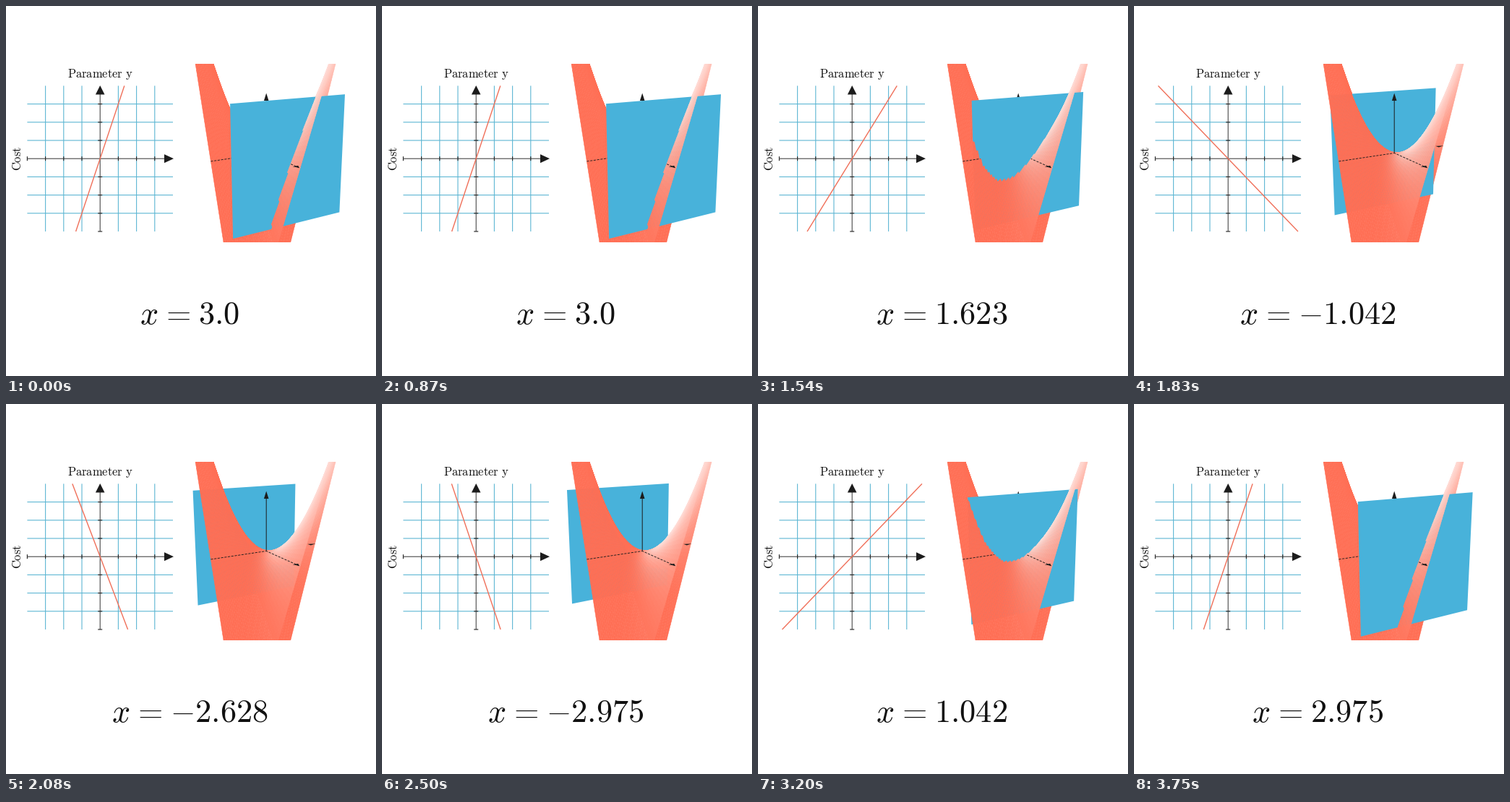
A matplotlib script that plays this animation: 512x512 px, repeating every 3850 ms.

```python
import numpy as np
import matplotlib.pyplot as plt
from matplotlib.animation import FuncAnimation
from matplotlib.collections import LineCollection, PolyCollection
from matplotlib.colors import to_rgb
from matplotlib.patches import Polygon, Rectangle

DPI = 64
LOOP, TICK = 3850, 25
RED, BLUE, GRID, INK = "#ff6f55", "#48b2da", "#5cb6d3", "#1c1c1c"
PHI, THETA = np.radians(75), np.radians(-30)
FOCAL, SCALE = 29.0, 20.7
CENTER = np.array([360.2, 203.5])
BEND = 0.75                      # surface: z = BEND * x * y
HOLD, SWEEP = 15, 21             # steps at rest, steps per sweep

# moments (step, ms) between which the steps are evenly spread
BEATS = np.array([
    (0, 0), (1, 80), (8, 540), (9, 620), (13, 870), (14, 950), (16, 1080),
    (17, 1160), (23, 1540), (24, 1620), (25, 1660), (26, 1750), (31, 2080),
    (32, 2160), (33, 2200), (34, 2290), (41, 2750), (42, 2830), (43, 2870),
    (44, 2950), (48, 3200), (49, 3290), (50, 3330), (51, 3410), (56, 3750),
    (57, LOOP)])


def pt(px):
    return px * 72 / DPI


def smooth(u):
    def sig(v):
        return 1 / (1 + np.exp(-v))
    edge = sig(-5)
    return (sig(10 * (u - 0.5)) - edge) / (1 - 2 * edge)


def value_at(ms):
    step = int(np.interp(ms, BEATS[:, 1], BEATS[:, 0]) + 1e-6)
    k = max(step - HOLD, 0)
    if k <= SWEEP:
        return 3 - 6 * smooth(k / SWEEP)
    return -3 + 6 * smooth((k - SWEEP) / SWEEP)


def depth(x, y, z):
    toward = np.cos(THETA) * x + np.sin(THETA) * y
    return np.sin(PHI) * toward + np.cos(PHI) * z


def project(x, y, z):
    x, y, z = np.broadcast_arrays(*(np.asarray(c, float) for c in (x, y, z)))
    right = -np.sin(THETA) * x + np.cos(THETA) * y
    toward = np.cos(THETA) * x + np.sin(THETA) * y
    up = np.sin(PHI) * z - np.cos(PHI) * toward
    m = SCALE * FOCAL / (FOCAL - depth(x, y, z))
    return np.stack([CENTER[0] + m * right, CENTER[1] - m * up], axis=-1)


def surface(n=70):
    """Faces of the saddle from back to front: outlines, colours, depths."""
    g = np.linspace(-4, 4, n + 1)
    x, y = np.meshgrid(g, g, indexing="ij")
    p = project(x, y, BEND * x * y)
    quads = np.stack([p[:-1, :-1], p[1:, :-1], p[1:, 1:], p[:-1, 1:]], axis=2)
    quads = quads.reshape(-1, 4, 2)

    mid = (g[:-1] + g[1:]) / 2
    x, y = (c.ravel() for c in np.meshgrid(mid, mid, indexing="ij"))
    z = BEND * x * y
    normal = np.stack([-BEND * y, -BEND * x, np.ones_like(x)], axis=1)
    sun = np.array([-7, -9, 10]) - 0.668 * np.stack([x, y, z], axis=1)
    dot = (normal * sun).sum(1)
    dot /= np.linalg.norm(normal, axis=1) * np.linalg.norm(sun, axis=1)
    gloss = 0.8 * np.clip(dot, 0, 1)[:, None] ** 3
    rgb = gloss + (1 - gloss) * np.array(to_rgb(RED))

    d = depth(x, y, z)
    seen = (quads[:, :, 1].max(1) > 79) & (quads[:, :, 1].min(1) < 328)
    order = np.argsort(d)
    order = order[seen[order]]
    return quads[order], rgb[order], d[order]


fig = plt.figure(figsize=(512 / DPI, 512 / DPI), dpi=DPI, facecolor="white")
ax = fig.add_axes([0, 0, 1, 1])
ax.set_xlim(0, 512)
ax.set_ylim(512, 0)
ax.axis("off")


def stroke(xs, ys, color=INK, px=1.0, z=2, **kw):
    return ax.plot(xs, ys, color=color, lw=pt(px), zorder=z, snap=False,
                   solid_capstyle="butt", **kw)[0]


def triangle(points, z):
    patch = Polygon(points, closed=True, fc=INK, ec="none", zorder=z)
    return ax.add_patch(patch)


def label(x, y, text, px, **kw):
    return ax.text(x, y, text, fontsize=pt(px), color="#111111", ha="center",
                   math_fontfamily="cm", **kw)


def segments(parts, color, z):
    ax.add_collection(LineCollection(parts, colors=color, lw=pt(1.1),
                                     zorder=z, snap=False))


# flat chart
OX, OY, UNIT, HALF = 130.2, 211.2, 25.2, 100.8
lines, marks = [], [[(OX - HALF, OY - 3), (OX - HALF, OY + 3)],
                    [(OX - 3, OY + HALF), (OX + 3, OY + HALF)]]
for i in (-3, -2, -1, 1, 2, 3):
    gx, gy = OX + i * UNIT, OY + i * UNIT
    lines += [[(gx, OY - HALF), (gx, OY + HALF)],
              [(OX - HALF, gy), (OX + HALF, gy)]]
    marks += [[(gx, OY - 3), (gx, OY + 3)], [(OX - 3, gy), (OX + 3, gy)]]
segments(lines, GRID, 1)
segments(marks, INK, 2)
stroke([OX - HALF, OX + HALF - 6], [OY, OY], "#333333")
stroke([OX, OX], [OY - HALF + 6, OY + HALF], "#333333")
triangle([(232, OY), (219, OY - 6), (219, OY + 6)], 3)
triangle([(OX, 110), (OX - 6.3, 122.5), (OX + 6.3, 122.5)], 3)
slope_line = stroke([], [], "#f0705a", 1.4, z=4)
label(130.5, 98.5, r"$\mathrm{Parameter\ y}$", 16.5, va="baseline")
label(16.3, 211, r"$\mathrm{Cost}$", 16.5, va="center", rotation=90)
readout = label(254.4, 440, "", 44.3, va="baseline")

# space view
quads, rgb, face_depth = surface()
panel = Rectangle((236, 79.5), 250, 247.5, transform=ax.transData)


def face_layer(z):
    layer = PolyCollection([], zorder=z, linewidths=pt(0.5))
    ax.add_collection(layer)
    layer.set_clip_path(panel)
    return layer


def axis_piece(start, end, z):
    p = project(*np.array([start, end], float).T)
    return stroke(p[:, 0], p[:, 1], px=0.9, z=z, dashes=(3.5, 1.8))


X_END, Y_TIP = 3.9, 3.5
back, front = face_layer(11), face_layer(14)
plane = ax.add_patch(Polygon(np.zeros((4, 2)), fc=BLUE, ec="none", zorder=13))

axis_piece((0, -4, 0), (0, 0, 0), 12)
axis_piece((X_END, 0, 0), (0, 0, 0), 12)
y_tip = triangle(project([0, .2, -.2], [4.05, Y_TIP, Y_TIP], 0), 12)
near_y = axis_piece((0, -4, 0), (0, 0, 0), 15)
near_x = axis_piece((X_END, 0, 0), (0, 0, 0), 15)
triangle(project([X_END, X_END - .4, X_END - .4], [0, .2, -.2], 0), 15)

top = project(0, 0, 4)
z_line = stroke([CENTER[0]] * 2, [CENTER[1], top[1] + 8])
z_tip = triangle([top, top + (-3.3, 10.5), top + (3.3, 10.5)], 12)


def set_span(line, start, end):
    p = project(*np.array([start, end], float).T)
    line.set_data(p[:, 0], p[:, 1])


def draw(n):
    x = value_at(n * TICK + 20)
    number = str(round(float(x), 3)).replace("-", "{-}")
    readout.set_text(r"$x\hspace{0.078}=\hspace{0.078}" + number + "$")

    reach = min(4, 4 / max(abs(x), 1e-6))
    ys = np.array([-reach, reach])
    slope_line.set_data(OX + UNIT * ys, OY - UNIT * x * ys)

    # the plane is sorted as one piece, by the depth of its middle
    d = depth(x, 0, 0)
    near = face_depth > d
    for layer, pick in ((back, ~near), (front, near)):
        layer.set_verts(quads[pick])
        layer.set_facecolor(rgb[pick])
        layer.set_edgecolor(rgb[pick])
    plane.set_xy(project(x, [-4, 4, 4, -4], [4, 4, -4, -4]))

    y_cut = np.clip(d / depth(0, 1, 0), -4, 0)
    near_y.set_visible(y_cut > -4)
    set_span(near_y, (0, -4, 0), (0, y_cut, 0))
    set_span(near_x, (X_END, 0, 0), (max(x, 0), 0, 0))
    y_tip.set_zorder(15 if depth(0, Y_TIP, 0) > d else 12)
    for part in (z_line, z_tip):
        part.set_zorder(12 if x > 0 else 15)
    return []


anim = FuncAnimation(fig, draw, frames=LOOP // TICK, init_func=lambda: draw(0),
                     interval=TICK, repeat=True, repeat_delay=0, blit=False)
plt.show()
```
